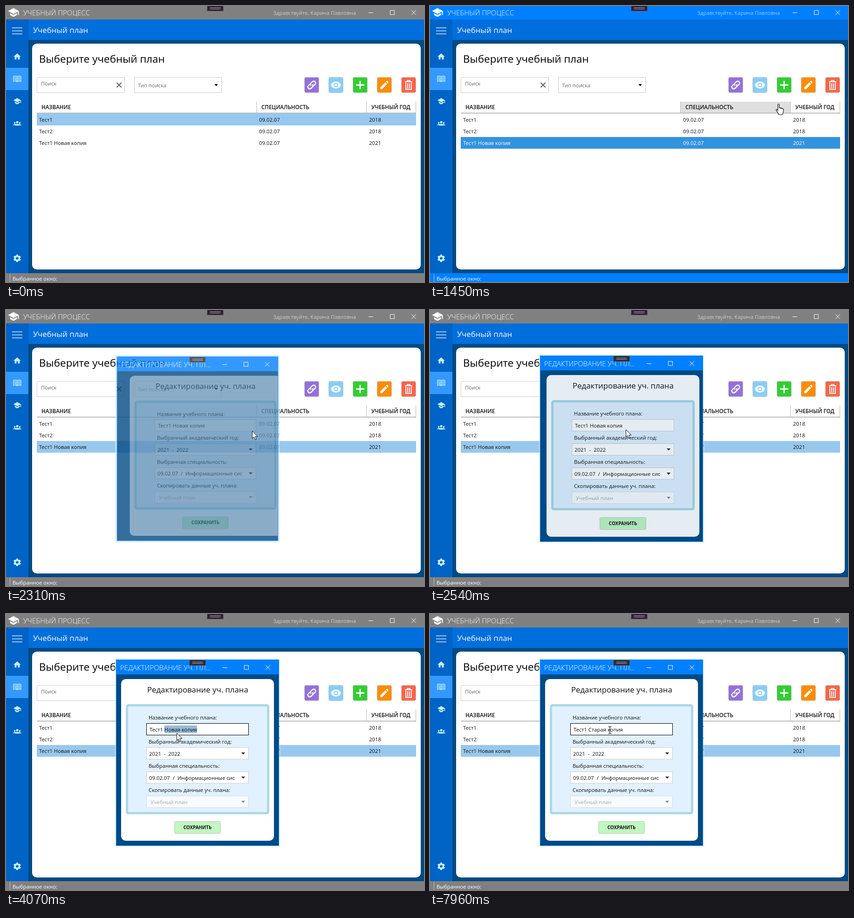
An HTML page that plays this animation: 897x594 px, repeating every 8 s.

```html
<!DOCTYPE html>
<html lang="ru">
<head>
<meta charset="utf-8">
<style>
  html, body { margin: 0; width: 100%; height: 100%; overflow: hidden; background: #004a84; }
  svg { display: block; width: 100%; height: 100%; }
  text { font: 11.3px "Open Sans", "Noto Sans", sans-serif; white-space: pre; }
  .title { font-size: 15.1px; font-weight: 300; }
  .heading { font-size: 16.8px; }
  .large { font-size: 22.4px; }
  .column { font-size: 11.6px; font-weight: 600; }
  .button { font-size: 9.9px; font-weight: 700; }
</style>
</head>
<body>
<svg id="stage" viewBox="0 0 897 594"></svg>
<script>
const LOOP = 8000;
const ACCENT = '#0080ff', INACTIVE = '#808080', DEEP = '#004a84';
const ROWS = [['Тест1', '2018'], ['Тест2', '2018'], ['Тест1 Новая копия', '2021']];
const PREFIX = 'Тест1 ', OLD_TAIL = 'Новая копия', NEW_TAIL = 'Старая копия';
const KEY_TIMES = [5010, 5230, 5400, 5790, 5900, 6120, 6290, 6400, 6570, 6680, 6840, 7060];
// Pointer path: time, x, y
const POINTER = [
  [110, 470, 541], [420, 520, 410], [640, 575, 274], [870, 600, 292], [1030, 600, 292],
  [1250, 680, 255], [1450, 748, 211], [1740, 811, 172], [1850, 811, 172], [2080, 745, 192],
  [2190, 663, 206], [2310, 528, 260], [2540, 420, 257], [2710, 413, 253], [2900, 411, 253],
  [3290, 357, 256], [3510, 349, 255], [3790, 344, 255], [4010, 344, 255], [4070, 366, 256],
  [7900, 366, 256], [7960, 386, 250]
];

const rect = (x, y, w, h, fill, extra = '') =>
  `<rect x="${x}" y="${y}" width="${w}" height="${h}" fill="${fill}" ${extra}/>`;
const box = (x, y, w, h, fill, stroke, r = 0, extra = '') =>
  rect(x + .5, y + .5, w - 1, h - 1, fill, `stroke="${stroke}" rx="${r}" ${extra}`);
const text = (x, y, content, fill = '#111', cls = '', extra = '') =>
  `<text x="${x}" y="${y}" fill="${fill}" class="${cls}" ${extra}>${content}</text>`;
const line = (d, stroke, width = 1, extra = '') =>
  `<path d="${d}" fill="none" stroke="${stroke}" stroke-width="${width}" ${extra}/>`;
const shape = (d, fill, extra = '') => `<path d="${d}" fill="${fill}" ${extra}/>`;
const group = (content, extra) => `<g ${extra}>${content}</g>`;
// Places a 24-unit icon around a centre point
const icon = (cx, cy, scale, content) =>
  group(content, `transform="translate(${cx} ${cy}) scale(${scale}) translate(-12 -12)"`);
const triangle = (x, y, fill = '#111') => shape(`M${x - 4} ${y - 2}h8l-4 4.5z`, fill);
const windowButtons = (x, y) => line(
  `M${x} ${y + .5}h10M${x + 46.5} ${y - 4.5}h9v9h-9zM${x + 92} ${y - 5}l10 10m0-10l-10 10`, '#fff');
const handle = (x, y, fill) =>
  box(x, y, 35, 12, fill, '#4b4152') + line(`M${x + 6} ${y + 4.5}h23m-23 3h23`, '#b5adb8');

const CAP = 'M12 3L1 9l11 6 9-4.91V17h2V9zM5 13.18v4L12 21l7-3.82v-4L12 17z';
const HOME = 'M10 20v-6h4v6h5v-8h3L12 3 2 12h3v8z';
const EYE = 'M12 4.5C7 4.5 2.73 7.61 1 12c1.73 4.39 6 7.5 11 7.5s9.27-3.11 11-7.5c-1.73-4.39-6-7.5-11-7.5z' +
  'M12 17a5 5 0 1 1 0-10 5 5 0 0 1 0 10zm0-8a3 3 0 1 0 0 6 3 3 0 0 0 0-6z';
const PENCIL = 'M3 17.25V21h3.75L17.81 9.94l-3.75-3.75zM20.71 7.04c.39-.39.39-1.02 0-1.41l-2.34-2.34' +
  'c-.39-.39-1.02-.39-1.41 0l-1.83 1.83 3.75 3.75z';

function sidebar() {
  const tint = '#c9f3ff';
  const book = line('M12 5.5Q7 2.5 1.5 4.5V19Q7 17 12 20Q17 17 22.5 19V4.5Q17 2.5 12 5.5V20', tint, 2) +
    line('M4 8q3-.8 6 .5M4 11.5q3-.8 6 .5M4 15q3-.8 6 .5M14 8.5q3-1.300 6-.5M14 12q3-1.300 6-.5M14 15.500q3-1.300 6-.5', tint, 1.7);
  const person = (x, y, s) => shape('M-3.500 0a3.500 3.500 0 1 1 7 0a3.500 3.500 0 1 1-7 0M-6 10V8.500C-6 3.800 6 3.800 6 8.500V10z',
    tint, `transform="translate(${x} ${y}) scale(${s})"`);
  const teeth = [0, 60, 120].map(a => line('M12 2V22', tint, 5, `transform="rotate(${a} 12 12)"`)).join('');
  return rect(0, 29, 48, 546, '#0063c6') + rect(0, 133, 48, 48, '#3399ff') +
    line('M13 47h22M13 53.500h22M13 60h22', '#8fcdf8', 2) +
    icon(24, 109, .78, shape(HOME, tint)) +
    icon(24, 157, .74, book) +
    icon(24, 205, .74, shape(CAP, tint)) +
    icon(24, 253, .7, person(4.500, 10, .75) + person(19.500, 10, .75) + person(12, 8, 1)) +
    icon(24, 543, .8, teeth + '<circle cx="12" cy="12" r="8" fill="#c9f3ff"/><circle cx="12" cy="12" r="3.500" fill="#0063c6"/>');
}

function toolbar() {
  const link = group(line('M0 -4h-6a4 4 0 0 0 0 8h4a4 4 0 0 0 4-4', '#fff', 2.6) +
    line('M0 4h6a4 4 0 0 0 0-8h-4a4 4 0 0 0-4 4', '#fff', 2.6), 'transform="translate(12 12) rotate(-45)"');
  const bin = line('M4 5h16M9 4.500V2.500h6v2M6 7v14.500h12V7M10 8.500v11M14 8.500v11', '#fff', 1.9);
  return [
    ['#9370db', link], ['#87cefa', shape(EYE, '#fff')],
    ['#32cd32', line('M12 3V21M3 12H21', '#fff', 2.800)],
    ['#ff8c00', shape(PENCIL, '#fff')], ['#ff6347', bin]
  ].map(([color, glyph], i) =>
    box(640 + i * 52, 153, 32, 34, color, '#c9c9c9', 3) + icon(656 + i * 52, 170, 1, glyph)).join('');
}

function mainWindow() {
  const table = ROWS.map(([name, year], i) => {
    const y = 249 + i * 25.2;
    return rect(66, i ? 231.500 + i * 25.2 : 231, 814, i ? 25.2 : 26, 'none', `id="row${i}"`) +
      group(text(71, y, name, 'inherit') + text(543, y, '09.02.07', 'inherit') + text(779, y, year, 'inherit'),
        `id="rowText${i}"`).replaceAll('fill="inherit"', '');
  }).join('');
  return rect(0, 0, 897, 594, DEEP) +
    rect(0, 0, 897, 29, INACTIVE, 'class="chrome"') + rect(0, 575, 897, 19, INACTIVE, 'class="chrome"') +
    icon(16, 14, 1.05, shape(CAP, '#fff')) +
    text(37, 20, 'УЧЕБНЫЙ ПРОЦЕСС', '#fff', 'title') +
    text(751, 19, 'Здравствуйте, Карина Павловна', '#fff', '', 'text-anchor="end" opacity=".6"') +
    windowButtons(778, 14) + handle(431.500, -1, '#2f1f35') +
    rect(48, 29, 849, 44, '#006edc') + text(58, 58, 'Учебный план', '#fff', 'heading') + sidebar() +
    rect(56, 81, 834, 486, '#fff', 'rx="10"') +
    text(71, 122, 'Выберите учебный план', '#000', 'large') +
    box(66, 153, 189, 34, '#fff', '#ccc') + text(75, 171, 'Поиск', '#666') +
    line('M237.500 165l10 10m0-10l-10 10', '#666', 2.200) +
    box(275, 153, 188, 34, '#fff', '#ccc') + text(283, 175, 'Тип поиска', '#666') + triangle(451, 170) +
    toolbar() + rect(537, 206, 236, 24, 'none', 'id="headerHover"') +
    text(76, 222, 'НАЗВАНИЕ', '#111', 'column') + text(548, 222, 'СПЕЦИАЛЬНОСТЬ', '#111', 'column') +
    text(784, 222, 'УЧЕБНЫЙ ГОД', '#111', 'column') +
    line('M537.500 206v24M773.500 206v24M879.500 206v24', '#bbb') + rect(66, 229.500, 814, 2, '#b9b9b9') + table +
    line('M8.500 577v17', '#c4c4c4') + text(14, 591, 'Выбранное окно:', '#fff');
}

function dialog() {
  const labels = ['Название учебного плана:', 'Выбранный академический год:', 'Выбранная специальность:', 'Скопировать данные уч. плана:'];
  const values = ['', '2021  -  2022', '09.02.07  /  Информационные сис', ' Учебный план'];
  const fields = labels.map((label, i) => {
    const y = 235 + i * 52, off = i === 3;
    return text(306, y - 8, label) +
      box(301, y, 220, 26, off ? '#f8fbff' : '#fff', off ? '#d6dde2' : '#ccc', 0, `id="field${i}"`) +
      text(307, y + 18, values[i], off ? '#a3aaa8' : '#111') +
      (i ? triangle(509, y + 13, off ? '#888' : '#111') : '');
  }).join('');
  const content = rect(247, 140, 328, 348, '#fff', 'rx="10"') +
    text(303, 169, 'Редактирование уч. плана', '#111', 'heading') +
    rect(259.500, 196.500, 303, 232, '#e1f1ff', 'rx="3" stroke="#add8e6" stroke-width="5"') + fields +
    rect(0, 240, 0, 16, '#95bbd8', 'id="selection"') + text(308, 253, '', '#111', '', 'id="planName"') +
    rect(0, 240, 1, 16, '#000', 'id="caret"') +
    box(361, 446, 100, 27, '#c1f6c1', '#bfc9bf', 3) + text(411, 463, 'СОХРАНИТЬ', '#111', 'button', 'text-anchor="middle"');
  return box(234, 96, 354, 405, 'none', '#d5eaff', 2, 'stroke-width="3" id="glow"') +
    rect(236, 98, 350, 401, ACCENT) + rect(237, 130, 348, 368, DEEP) +
    text(245, 121, 'РЕДАКТИРОВАНИЕ УЧ. ПЛ...', '#fff', 'title') + windowButtons(465, 115) + handle(393.500, 99, '#2b2b30') +
    group(group(content, 'id="content"'), 'clip-path="url(#dialogClip)"');
}

const pointer = group(
  shape('M.5 .5V16.500L4.200 13l2.600 6.200 2.600-1.100-2.600-6H12z', '#fff', 'id="arrow" stroke="#111"') +
  shape('M-1.500 1.500c0-2 3-2 3 0V9c0-2 3-1.600 3 0v1c0-2 3-1.500 3 0v1c0-1.600 3-1.300 3 .4V16c0 3-2 4-2 7H.5' +
    'c0-3-4-6-5.500-9.500c-.7-2 1.500-2.500 2.500-1l1 1.500z', '#fff', 'id="hand" stroke="#111" stroke-width="1.200"') +
  line('M-3.500 -7.500h2.500l1 1 1-1h2.500M0 -6.500V6.500M-3.500 7.500h2.500l1-1 1 1h2.500', '#111', 1.200, 'id="ibeam"'),
  'id="pointer"');

const stage = document.getElementById('stage');
stage.innerHTML = '<clipPath id="dialogClip"><rect x="237" y="130" width="348" height="368"/></clipPath>' +
  mainWindow() + group(dialog(), 'id="dialog"') +
  '<circle id="press" r="12" fill="#f7ec3c" opacity=".65"/>' + pointer;

const el = id => document.getElementById(id);
const show = (id, visible) => el(id).setAttribute('visibility', visible ? 'visible' : 'hidden');
const set = (id, attrs) => { for (const key in attrs) el(id).setAttribute(key, attrs[key]); };
const progress = (t, from, to) => Math.min(1, Math.max(0, (t - from) / (to - from)));
const easeOut = u => 1 - (1 - u) ** 2;
const mix = (a, b, u) => a + (b - a) * u;
const during = (t, from, to) => t >= from && t < to;

function pointerAt(t) {
  const i = POINTER.findIndex(p => p[0] > t);
  if (i < 1) return POINTER[i < 0 ? POINTER.length - 1 : 0].slice(1);
  const [t0, x0, y0] = POINTER[i - 1], [t1, x1, y1] = POINTER[i], u = (t - t0) / (t1 - t0);
  return [mix(x0, x1, u), mix(y0, y1, u)];
}

function drawMain(t, x, y) {
  const active = during(t, 1030, 2140);
  document.querySelectorAll('.chrome').forEach(bar => bar.setAttribute('fill', active ? ACCENT : INACTIVE));
  const selected = t < 1030 ? 0 : 2;
  const hovered = during(t, 110, 1850) ? Math.floor((y - 231.500) / 25.2) : -1;
  ROWS.forEach((_, i) => {
    const chosen = i === selected;
    set('row' + i, { fill: chosen ? (active ? '#3393df' : '#99c8ee') : i === hovered ? '#cce4f7' : 'none' });
    set('rowText' + i, { fill: chosen && active ? '#fff' : '#111' });
  });
  const overHeader = during(t, 1030, 2140) && y > 206 && y < 230 && x > 537 && x < 773;
  set('headerHover', { fill: overHeader ? '#dfdfdf' : 'none' });
}

function drawDialog(t) {
  const opening = easeOut(progress(t, 2200, 2400)), slide = easeOut(progress(t, 2180, 2710));
  const scale = mix(.95, 1, opening);
  show('dialog', t >= 2200);
  set('dialog', { opacity: opening, transform: `translate(411 298.500) scale(${scale}) translate(-411 -298.500)` });
  set('glow', { opacity: mix(1, .35, progress(t, 2310, 2500)) });
  set('content', { opacity: slide, transform: `translate(${30 * (1 - slide)} 0)` });
  set('field0', { stroke: t >= 2880 ? '#000' : '#ccc' });

  const typed = KEY_TIMES.filter(time => time <= t).length;
  const name = PREFIX + (typed ? NEW_TAIL.slice(0, typed) : OLD_TAIL);
  const label = el('planName');
  if (label.textContent !== name) label.textContent = name;
  const edge = n => 308 + (n ? label.getSubStringLength(0, n) : 0);

  const start = Math.round(t < 3290 ? mix(17, 9, progress(t, 2950, 3290)) : mix(9, 6, progress(t, 3290, 3700)));
  const selecting = during(t, 2950, 5010);
  const left = selecting ? edge(start) : 0;
  set('selection', { x: left, width: selecting ? edge(name.length) - left : 0 });
  const caretOn = during(t, 2880, 2950) || during(t, 5010, 7670);
  set('caret', { x: Math.round(edge(name.length)), width: caretOn ? 1 : 0 });
}

function drawPointer(t, x, y) {
  const visible = during(t, 110, 5070) || t >= 7670;
  const hand = during(t, 1030, 2100) && y < 230, beam = t >= 7930;
  set('pointer', { transform: `translate(${x} ${y})` });
  show('hand', visible && hand);
  show('ibeam', visible && beam);
  show('arrow', visible && !hand && !beam);
  set('press', { cx: x, cy: y + 1 });
  show('press', during(t, 1030, 1140) || during(t, 1740, 1850) || during(t, 2900, 3790));
}

function render(now) {
  const t = now % LOOP, [x, y] = pointerAt(t);
  drawMain(t, x, y);
  drawDialog(t);
  drawPointer(t, x, y);
}

let startTime;
function tick(now) {
  startTime ??= now;
  render(now - startTime);
  requestAnimationFrame(tick);
}
render(0);
requestAnimationFrame(tick);
</script>
</body>
</html>
```
